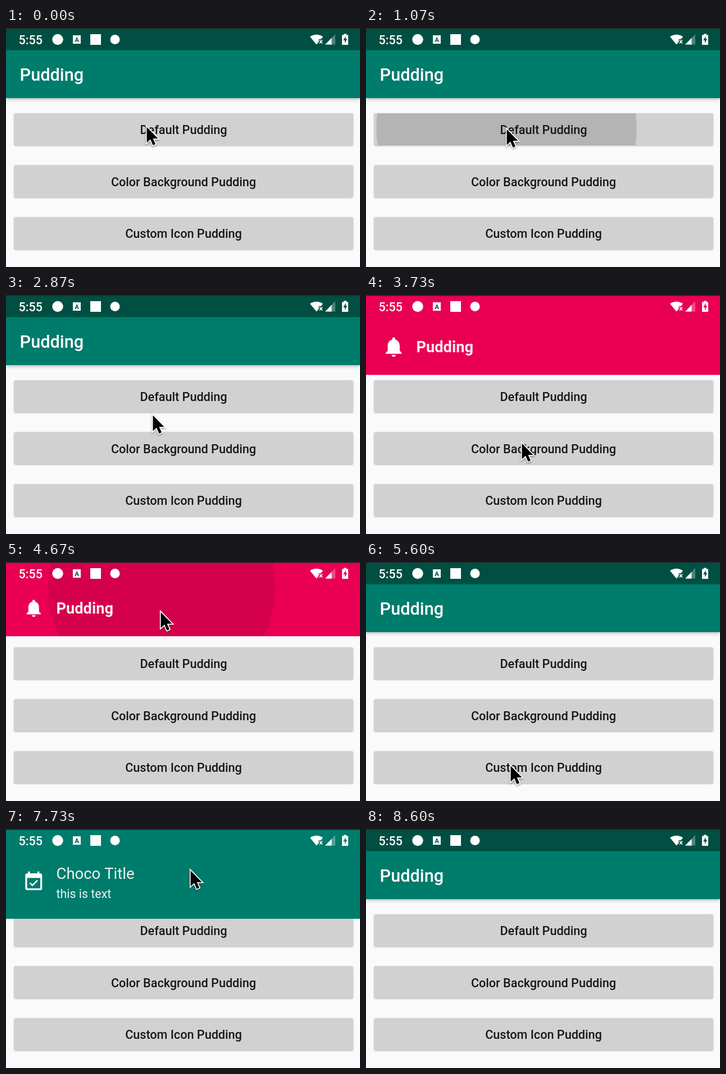
An HTML page with a canvas for the animation above (8.74 s loop, 630x426 px).

```html
<!DOCTYPE html>
<html lang="en">
<head>
<meta charset="utf-8">
<title>Pudding</title>
<style>
  html, body { margin: 0; width: 100%; height: 100%; overflow: hidden; background: #fafafa; }
  canvas { display: block; width: 630px; height: 426px; }
</style>
</head>
<body>
<canvas id="stage"></canvas>
<script>
const LOOP = 8740, W = 630, H = 426;
const GREEN = '#007c6c', DARK_GREEN = '#004f42', PINK = '#ea0053';
const canvas = document.getElementById('stage');
const ctx = canvas.getContext('2d');
const ratio = window.devicePixelRatio || 1;
canvas.width = W * ratio;
canvas.height = H * ratio;

const bell = new Path2D('M12 22c1.1 0 2-.9 2-2h-4c0 1.1.89 2 2 2zm6-6v-5c0-3.07-1.64-5.64-4.5-6.32V4c0-.83-.67-1.5-1.5-1.5s-1.5.67-1.5 1.5v.68C7.63 5.36 6 7.92 6 11v5l-2 2v1h16v-1l-2-2z');
const calendar = new Path2D('M16.53 11.06L15.47 10l-4.88 4.88-2.12-2.12-1.06 1.06L10.59 17l5.94-5.94zM19 3h-1V1h-2v2H8V1H6v2H5c-1.1 0-2 .9-2 2v14c0 1.1.9 2 2 2h14c1.1 0 2-.9 2-2V5c0-1.1-.9-2-2-2zm0 16H5V8h14v11z');
const arrow = new Path2D('M0 0V28L6.5 22 11 32.5 15.5 30.5 11 20.5H20z');
const wifi = new Path2D('M541 15.5Q552.5 8 564 15.5L560.5 20H556.5V25L552.5 29.5z');
const battery = new Path2D('M601 10.5h5v2h3v17.5h-11V12.5h3zM604.6 14.5l-4.4 7.5h2.8v5l4.2-7.5h-2.6z');

const buttons = [
  { label: 'Default Pudding', y: 152, press: 930, x: 250 },
  { label: 'Color Background Pudding', y: 244.6, press: 3150, x: 275 },
  { label: 'Custom Icon Pudding', y: 337.2, press: 6000, x: 257 },
];

const banners = [
  { enter: 1220, leave: 2490, rest: 160, color: GREEN, icon: bell, iconUp: 67, title: 'This is Title', text: 'this is text' },
  { enter: 3440, leave: 4617, rest: 126, color: PINK, icon: bell, iconUp: 50, title: 'Pudding', tap: 4570 },
  { enter: 6322, leave: 8270, rest: 160, color: GREEN, icon: calendar, iconUp: 66, title: 'Choco Title', text: 'this is text' },
];

// time, x, y of the pointer
const pointerPath = [
  [600, 249, 174], [730, 249, 178], [2740, 249, 178], [3040, 276, 262],
  [3800, 276, 262], [4450, 274, 87], [4850, 274, 87], [5530, 255, 360],
  [5600, 256, 361], [6640, 256, 361], [6940, 290, 186], [7500, 320, 100],
  [7860, 330, 60], [8060, 340, -45],
];

const clamp = v => Math.min(1, Math.max(0, v));

function overshoot(p) {
  const u = clamp(p) - 1;
  return u * u * (3 * u + 2) + 1;
}

function anticipateOvershoot(p) {
  const u = 2 * clamp(p);
  if (u < 1) return 0.5 * u * u * (4 * u - 3);
  const v = u - 2;
  return 0.5 * (v * v * (4 * v + 3) + 2);
}

function pointerAt(t) {
  let from = pointerPath[0];
  for (const to of pointerPath) {
    if (t < to[0]) {
      if (to === from) break;
      const p = clamp((t - from[0]) / (to[0] - from[0]));
      const e = p * p * (3 - 2 * p);
      return [from[1] + (to[1] - from[1]) * e, from[2] + (to[2] - from[2]) * e];
    }
    from = to;
  }
  return [from[1], from[2]];
}

function rect(color, x, y, w, h) {
  ctx.fillStyle = color;
  ctx.fillRect(x, y, w, h);
}

function circle(color, x, y, r) {
  ctx.fillStyle = color;
  ctx.beginPath();
  ctx.arc(x, y, Math.max(0, r), 0, 7);
  ctx.fill();
}

function write(text, x, y, size, weight, color = '#fff', align = 'left') {
  ctx.font = `${weight} ${size}px Roboto, sans-serif`;
  ctx.textAlign = align;
  ctx.fillStyle = color;
  ctx.fillText(text, x, y);
}

function withShadow(color, blur, dy, draw) {
  ctx.save();
  ctx.shadowColor = color;
  ctx.shadowBlur = blur * ratio;
  ctx.shadowOffsetY = dy * ratio;
  draw();
  ctx.restore();
}

function drawButton({ label, y, press, x }, t) {
  ctx.beginPath();
  ctx.roundRect(14.5, y, 603, 57, 2);
  withShadow('rgba(0,0,0,.3)', 3, 1, () => {
    ctx.fillStyle = '#d0d1d0';
    ctx.fill();
  });
  const age = t - press;
  if (age > 0 && age < 500) {
    ctx.save();
    ctx.clip();
    circle(`rgba(0,0,0,${0.14 * clamp((500 - age) / 250)})`, x, y + 28, 20 + 1.5 * age);
    ctx.restore();
  }
  write(label, 316, y + 37, 21.6, 500, '#171717', 'center');
}

function drawBanner(b, t) {
  if (t < b.enter || t > b.leave + 500) return;
  const bottom = b.rest * (overshoot((t - b.enter) / 500) - anticipateOvershoot((t - b.leave) / 500));
  if (bottom <= 0) return;
  rect(b.color, 0, 0, W, bottom);
  if (t > b.tap) {
    ctx.save();
    ctx.beginPath();
    ctx.rect(0, 0, W, bottom);
    ctx.clip();
    circle('rgba(0,0,0,.09)', 277, bottom - 87, 2 * (t - b.tap));
    ctx.restore();
  }
  const pulse = 0.93 + 0.07 * Math.cos((t - b.enter - 340) / 1400 * 2 * Math.PI);
  ctx.save();
  ctx.translate(49.3, bottom - b.iconUp);
  ctx.scale(1.78 * pulse, 1.78 * pulse);
  ctx.translate(-12, -12);
  ctx.fillStyle = '#fff';
  ctx.fill(b.icon);
  ctx.restore();
  const soft = 'rgba(255,255,255,.92)';
  if (b.text) {
    write(b.title, 89.5, bottom - 71, 27.5, 400, soft);
    write(b.text, 89.5, bottom - 37, 21.4, 400, soft);
  } else {
    write(b.title, 89.5, bottom - 40, 27.2, 700, soft);
  }
}

function drawStatusIcons() {
  write('5:55', 22.5, 28.7, 21.5, 500);
  circle('#fff', 92, 20.5, 9.7);
  rect('#fff', 119, 13, 14, 15);
  write('A', 126, 24.7, 11.5, 700, DARK_GREEN, 'center');
  rect('#fff', 150, 11, 19, 19);
  circle('#fff', 194, 20.5, 8.5);

  ctx.fillStyle = '#fff';
  ctx.fill(wifi);
  ctx.fill(battery, 'evenodd');
  ctx.strokeStyle = '#fff';
  ctx.lineWidth = 1.7;
  ctx.stroke(new Path2D('M558 21.5l5 6M563 21.5l-5 6'));
  ctx.fillStyle = 'rgba(255,255,255,.3)';
  ctx.fill(new Path2D('M568 29.5H586V11z'));
  ctx.fillStyle = '#fff';
  ctx.fill(new Path2D('M568 29.5H579.5V17.7z'));
}

function drawPointer(t) {
  if (t >= 8060) return;
  const [x, y] = pointerAt(t);
  ctx.save();
  ctx.translate(x + 1.5, y + 2.5);
  ctx.lineWidth = 3.4;
  ctx.strokeStyle = '#fff';
  withShadow('rgba(0,0,0,.4)', 3, 1.5, () => ctx.stroke(arrow));
  ctx.fillStyle = '#000';
  ctx.fill(arrow);
  ctx.restore();
}

function draw(t) {
  ctx.setTransform(ratio, 0, 0, ratio, 0, 0);
  rect('#fafafa', 0, 0, W, H);
  withShadow('rgba(0,0,0,.28)', 6, 2, () => rect(GREEN, 0, 39, W, 86));
  rect(DARK_GREEN, 0, 0, W, 39.5);
  write('Pudding', 24.5, 94, 30.7, 500);
  buttons.forEach(b => drawButton(b, t));
  banners.forEach(b => drawBanner(b, t));
  drawStatusIcons();
  rect('#27282c', 0, 0, W, 1.6);
  drawPointer(t);
}

const start = performance.now();
function tick() {
  draw((performance.now() - start) % LOOP);
  requestAnimationFrame(tick);
}
tick();
</script>
</body>
</html>
```
